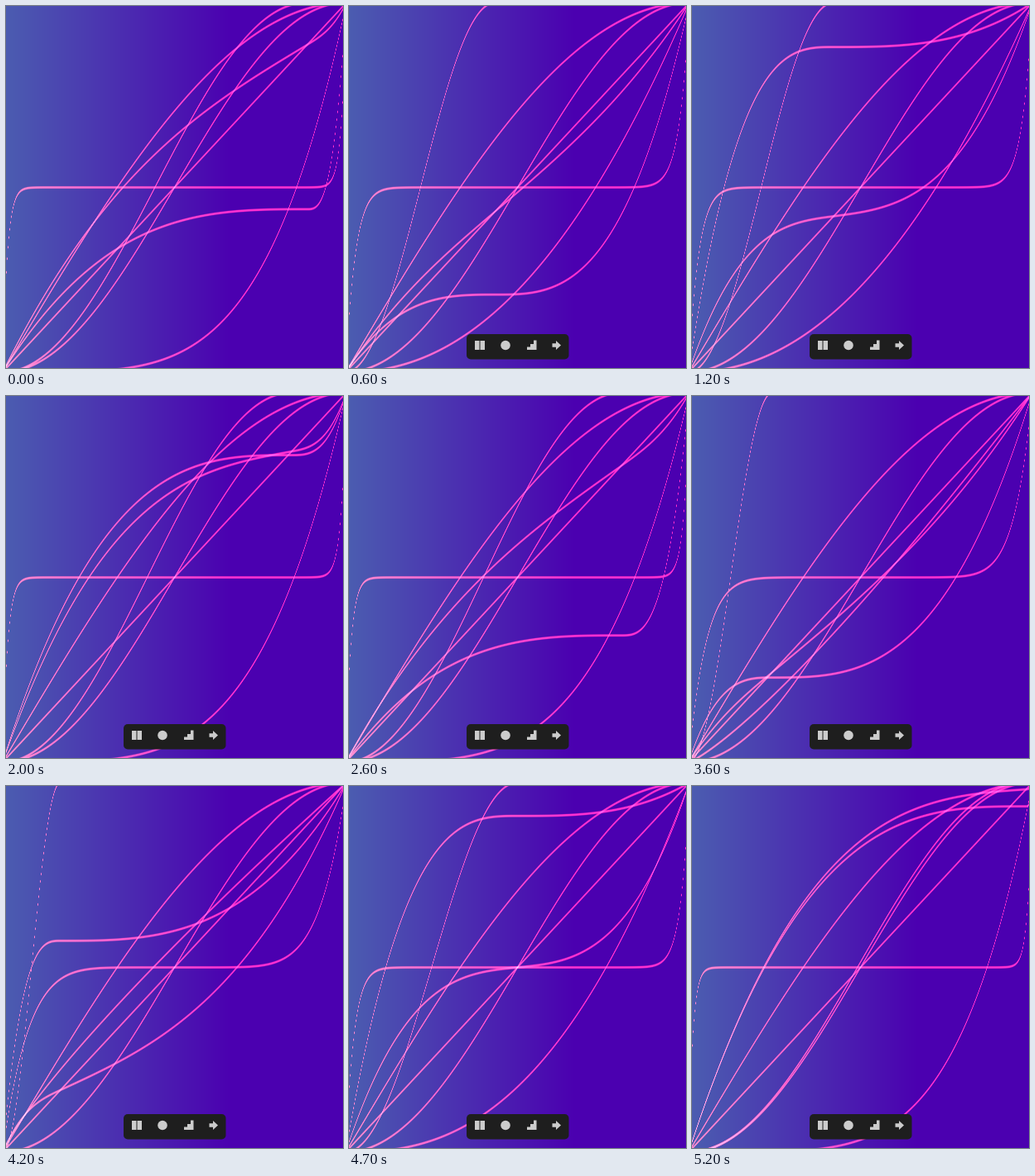
An HTML page with a canvas for the animation above (5.8 s loop, 407 px wide and 438 px high).

```html
<!DOCTYPE html>
<html lang="en">
<head>
<meta charset="utf-8">
<title>Shaping functions</title>
<style>
html, body { margin: 0; width: 100%; height: 100%; overflow: hidden; background: #4b00b0; }
canvas, svg { position: absolute; left: 0; top: 0; display: block; }
</style>
</head>
<body>
<canvas id="stage" width="407" height="438"></canvas>
<svg id="toolbar" width="407" height="438" fill="#ccc">
  <rect x="142" y="397" width="123.500" height="30.500" rx="5" fill="#1e1e1e"/>
  <path d="M152 405h5.500v11h-5.500zM158.500 405h5.500v11h-5.500z"/>
  <circle cx="189" cy="410.500" r="5.800"/>
  <path d="M215 412.500h4v-3.500h4v-4.500h3.500v11.500h-11.500z"/>
  <path d="M245.500 408.300h4.500v-3.300l6 5.500l-6 5.500v-3.300h-4.500z"/>
</svg>
<script>
const W = 407, H = 438, LOOP = 5800, STEP = 100, LAST = 5200;
const SPAN_X = 415, SPAN_Y = 447;  // the unit square is slightly larger than the stage
const HALF = 0.005;                // half line height in unit space
const GLOW = [255, 55, 38];

const ctx = document.getElementById('stage').getContext('2d');
const toolbar = document.getElementById('toolbar');
const image = ctx.createImageData(W, H);
const background = new Uint8ClampedArray(W * H * 4);
for (let i = 0; i < W * H; i++) {
  background.set([75, Math.max(0, 92 * (1 - (i % W) / 272)), 176, 255], i * 4);
}

// Pointer path: time, a, b
const path = [
  [100, .886, .441], [450, .62, .2], [750, .27, .3], [1000, .24, .67],
  [1200, .422, .88], [1600, .66, .945], [2000, .841, .831], [2300, .885, .6],
  [2600, .802, .343], [3100, .53, .14], [3600, .244, .229], [3900, .165, .38],
  [4200, .168, .572], [4700, .5, .91], [5200, .982, .936]
];

function slope(i, k) {
  const p = path[Math.max(0, i - 1)], q = path[Math.min(path.length - 1, i + 1)];
  return (q[k] - p[k]) / (q[0] - p[0]);
}

function pointer(time) {
  let i = 0;
  while (i < path.length - 2 && time >= path[i + 1][0]) i++;
  const p = path[i], q = path[i + 1], d = q[0] - p[0];
  const u = Math.min(1, Math.max(0, (time - p[0]) / d));
  return [1, 2].map(k => p[k] + (q[k] - p[k]) * smooth(u) +
    d * u * (1 - u) * ((1 - u) * slope(i, k) - u * slope(i + 1, k)));
}

const smooth = t => t * t * (3 - 2 * t);

// Polynomial approximation of a raised inverted cosine
const raisedCosine = x => (4 * x ** 6 - 17 * x ** 4 + 22 * x * x) / 9;

const seat = (x, a, b, p) => x <= a
  ? b - b * Math.pow(1 - x / a, p)
  : b + (1 - b) * Math.pow((x - a) / (1 - a), p);

const curves = [
  x => x,
  x => Math.sin(x * Math.PI / 2),
  raisedCosine,
  (x, a) => raisedCosine(Math.min(1, x / a)),
  (x, a) => Math.pow(x, 5 * a),
  (x, a) => seat(x, .5, .5, 40 * a),
  (x, a, b) => seat(x, a, b, 3),
  (x, a, b) => (1 - b) * x + b * seat(x, a, a, 3)
];

function plot(col, y) {
  const center = H / 2 + (.5 - y) * SPAN_Y, reach = HALF * SPAN_Y;
  const end = Math.min(H - 1, Math.floor(center + reach));
  for (let row = Math.max(0, Math.ceil(center - reach)); row <= end; row++) {
    const light = smooth(1 - Math.abs(row - center) / reach);
    const at = (row * W + col) * 4;
    for (let c = 0; c < 3; c++) image.data[at + c] += GLOW[c] * light;
  }
}

function draw(time) {
  const [a, b] = pointer(time);
  image.data.set(background);
  for (let col = 0; col < W; col++) {
    const x = .5 + (col + .5 - W / 2) / SPAN_X;
    for (const curve of curves) plot(col, curve(x, a, b));
  }
  ctx.putImageData(image, 0, 0);
  toolbar.style.display = time < 200 ? 'none' : 'block';
}

const start = performance.now();
let shown = -1;
function tick() {
  const now = (performance.now() - start) % LOOP;
  const time = now < 200 ? 0 : Math.min(LAST, Math.floor(now / STEP) * STEP);
  if (time !== shown) draw(shown = time);
  requestAnimationFrame(tick);
}
tick();
</script>
</body>
</html>
```
